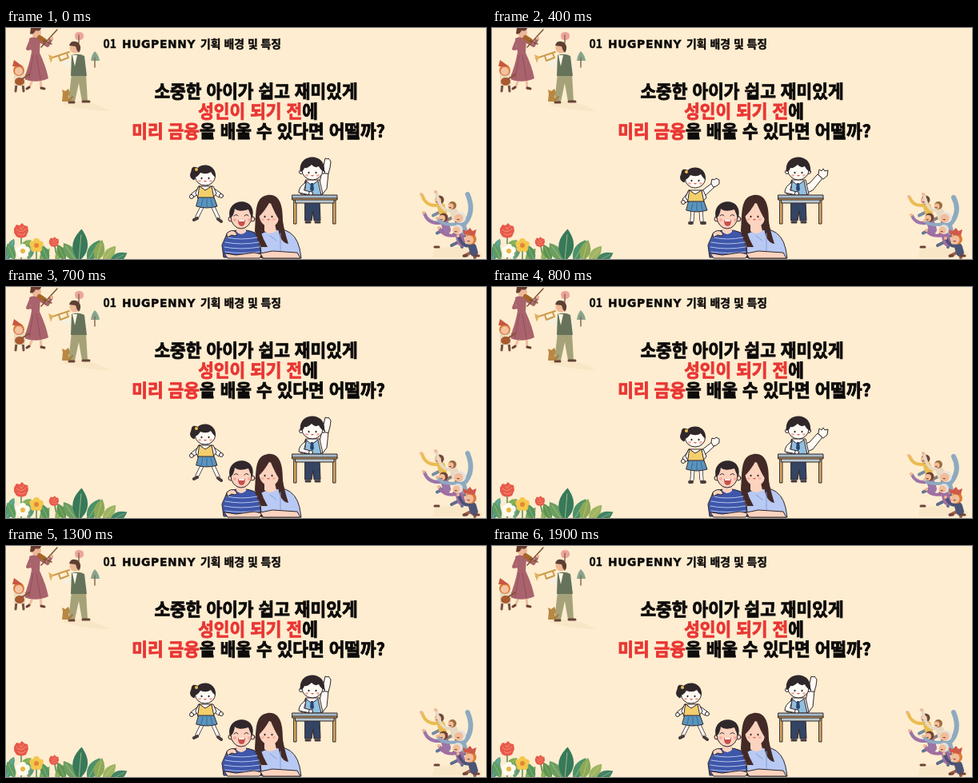
An HTML page for the animation above (2000 ms loop, 600 px wide and 289 px high).

```html
<!DOCTYPE html>
<html lang="ko">
<head>
<meta charset="utf-8">
<style>
  html, body { margin: 0; width: 100%; height: 100%; overflow: hidden; background: #feedd0; }
  svg { display: block; width: 600px; height: 289px; }
  text { font-family: "Noto Sans CJK KR", "Noto Sans CJK", sans-serif; font-weight: 900; fill: #0d0b0a; stroke: #0d0b0a; }
  .small { font-size: 13.9px; font-weight: 700; stroke-width: .4px; }
  .brand { font-family: "DejaVu Sans", sans-serif; font-size: 13.9px; letter-spacing: .6px; }
  .big { font-size: 21.4px; text-anchor: middle; stroke-width: .9px; }
  .red { fill: #e93633; stroke: #e93633; }
  .ink { stroke: #30262a; stroke-width: 1; stroke-linejoin: round; stroke-linecap: round; }
  .line { fill: none; stroke-linecap: round; stroke-linejoin: round; }
  .skin { fill: #fcd3be; }
  .white { fill: #fffaf4; }
  .hair { fill: #30272b; }
  .brown { fill: #432a27; }
</style>
</head>
<body>
<svg viewBox="0 0 600 289">
  <defs>
    <path id="leaf" d="M0 0Q-13-13 0-28Q13-13 0 0"/>
    <g id="petals">
      <circle cy="-5" r="4"/><circle cx="4.8" cy="-1.5" r="4"/><circle cx="3" cy="4" r="4"/>
      <circle cx="-3" cy="4" r="4"/><circle cx="-4.8" cy="-1.5" r="4"/>
    </g>
    <g id="carnation">
      <path d="M-9-3L-6-8-2-7 1-10 4-7 8-6 9 0 6 7Q0 10-6 7L-9 2Z" fill="#e8594b"/>
      <path class="line" d="M-6-2Q0 4 6-3M-4 3Q0 7 5 3M-2-5L0-2 3-6" stroke="#f59270"/>
    </g>
    <g id="face">
      <g fill="#282126"><ellipse cx="-4.5" rx="1" ry="1.3"/><ellipse cx="4.5" rx="1" ry="1.3"/></g>
      <g fill="#f6b3a5"><ellipse cx="-7" cy="3.5" rx="2" ry="1.4"/><ellipse cx="7" cy="3.5" rx="2" ry="1.4"/></g>
      <path d="M-2 3Q0 6 2 3Z" fill="#d8574f"/>
    </g>
    <g id="girlHead">
      <path class="hair ink" d="M-8-8Q-17-13-17-5Q-21 3-14 6Q-10 0-9-4Z"/>
      <ellipse class="white ink" cy="2" rx="12.500" ry="11"/>
      <path class="hair" d="M-13 3C-16-17 15-18 13 3Q9 0 7-4Q2 0-6-3Q-9 2-13 3Z"/>
      <circle cx="-11" cy="-7" r="2" fill="#e9c04e"/>
      <use href="#face" y="4"/>
    </g>
    <g id="girlBody">
      <path class="white ink" d="M241 198h18l4 9-4 5h-19l-3-5z"/>
      <path class="ink" d="M242 198l7 5 8-5 3 15h-20z" fill="#f4cf6c"/>
      <path class="ink" d="M241 212h19l4 11q-13 4-26 0z" fill="#5b94bd"/>
      <path class="line" d="M246 214l-2 9M251 214v10M256 214l2 9" stroke="#376a93"/>
    </g>
  </defs>
  <rect width="600" height="289" fill="#feedd0"/>

  <!-- musicians -->
  <g>
    <path d="M72 92Q104 88 130 104Q102 104 72 96Z" fill="#f9e6c6"/>
    <path d="M87 14q-3-8 3-9 8-1 7 7-3 5-10 2z" fill="#eda49b"/>
    <path d="M106 41q1-8 5-12 5 5 6 12z" fill="#86a58c"/>
    <path class="line" d="M91 9v10M111 37v12" stroke="#8b6a58" stroke-width="1.500"/>

    <path class="line" d="M34 63L29 75M43 63L44 76" stroke="#efbea0" stroke-width="3"/>
    <path class="line" d="M29 74l-3 2M44 75l4 1" stroke="#6b4038" stroke-width="3"/>
    <path d="M29 13Q36 9 43 14L42 31Q50 48 53 63Q38 70 22 64Q29 47 32 30Z" fill="#a9636d"/>
    <path class="line" d="M34 34L29 63M38 34L43 64" stroke="#90505d"/>
    <path class="line" d="M31 16L27 26L38 24M42 16L52 22L57 13" stroke="#a9636d" stroke-width="4"/>
    <circle cx="38" cy="6" r="6" fill="#edb799"/>
    <path d="M31 0h13Q43 5 37 3Q34 9 30 7Z" fill="#693c30"/>
    <path class="line" d="M42 12L48 16" stroke="#a6652a" stroke-width="6"/>
    <path class="line" d="M47 16L57 20M44 24L64 2" stroke="#7d5234" stroke-width="1.500"/>
    <circle cx="57" cy="13" r="2" fill="#edb799"/>

    <path d="M82 57h18l2 35h-7l-4-23-5 23h-8z" fill="#a5a279"/>
    <path class="line" d="M79 93h6M96 92h8" stroke="#674337" stroke-width="3"/>
    <path class="line" d="M85 36L75 46L69 38M97 37L100 49L82 47" stroke="#f6f0df" stroke-width="5"/>
    <path d="M82 34Q91 31 98 35L101 60H81z" fill="#66735a"/>
    <path d="M83 34h6l-3 14z" fill="#fff7e6"/>
    <circle cx="86" cy="25" r="6.500" fill="#eeb995"/>
    <path d="M79 22Q81 14 90 18Q96 24 91 31Q88 28 87 23Z" fill="#5d4034"/>
    <path class="line" d="M79 30L55 38M76 32l2 5-10 4-2-6" stroke="#cd9b4b" stroke-width="2"/>
    <path d="M59 36l-6-3 3 11z" fill="#e2b15b"/>

    <path class="line" d="M13 70l-1 9M21 70l1 9" stroke="#765045" stroke-width="3"/>
    <path d="M10 57h14v15H10z" fill="#e9dbc0"/>
    <circle cx="16" cy="53" r="7" fill="#d87b3e"/>
    <circle cx="16" cy="54" r="5" fill="#f5c2a0"/>
    <path d="M8 48L10 40L21 48Z" fill="#c9563f"/>
    <ellipse cx="17" cy="67" rx="6" ry="5" fill="#a9592f"/>
    <path class="line" d="M20 64L29 58" stroke="#865033" stroke-width="2"/>
    <path d="M70 92l1-10-1-5 4 2 4-3 2 5-2 5 3 6z" fill="#b88842"/>
    <path class="line" d="M79 91l4-5" stroke="#a97537" stroke-width="2"/>
  </g>

  <!-- flowers -->
  <g id="garden"></g>
  <use href="#carnation" x="19" y="254"/>
  <use href="#carnation" transform="translate(60 268) scale(.68)"/>
  <g fill="#fffbf0"><use href="#petals" x="21" y="279"/><circle cx="21" cy="279" r="3" fill="#eab541"/></g>
  <g fill="#f5c74c"><use href="#petals" x="38" y="272"/><circle cx="38" cy="272" r="3" fill="#e58735"/></g>

  <!-- heading -->
  <text class="small" x="121.500" y="25">01</text>
  <text class="small brand" x="145" y="25">HUGPENNY</text>
  <text class="small" x="243" y="25">기획 배경 및 특징</text>
  <text class="big" x="312.500" y="87">소중한 아이가 쉽고 재미있게</text>
  <text class="big" x="315" y="112"><tspan class="red">성인이 되기 전</tspan>에</text>
  <text class="big" x="315.500" y="137"><tspan class="red">미리 금융</tspan>을 배울 수 있다면 어떨까?</text>

  <!-- waving girl -->
  <g class="pose a">
    <path class="line ink" d="M246 222L239 236M258 222L265 237" style="stroke-width:5"/>
    <path class="line" d="M246 222L239 236M258 222L265 237" stroke="#fffaf4" stroke-width="3.500"/>
    <path class="line" d="M239 238l-4 2M265 239l4 3" stroke="#473c3d" stroke-width="4"/>
    <path class="white ink" d="M241 200l-10 8 3 4 9-6zM259 200l10 7-3 5-8-6z"/>
    <circle class="white ink" cx="232" cy="211" r="2.500"/><circle class="white ink" cx="269" cy="210" r="2.500"/>
    <use href="#girlBody"/><use href="#girlHead" x="249" y="184"/>
  </g>
  <g class="pose b">
    <path class="line ink" d="M251 228L250 241M261 228L262 241" style="stroke-width:5"/>
    <path class="line" d="M251 228L250 241M261 228L262 241" stroke="#fffaf4" stroke-width="3.500"/>
    <path class="line" d="M250 244h-3M262 244h4" stroke="#473c3d" stroke-width="4"/>
    <path class="white ink" d="M246 205l-8 9 4 5 7-7zM262 204l13-10 4 4-15 14z"/>
    <circle class="white ink" cx="239" cy="218" r="2.500"/>
    <path class="white ink" d="M274 194l1-5 3 1 2-2 4 2 0 5-4 3-3 1z"/>
    <use href="#girlBody" x="5" y="5"/><use href="#girlHead" x="254" y="187"/>
  </g>

  <!-- boy at the desk -->
  <g class="pose a">
    <path class="white ink" d="M390 202l5-22 8 1-2 20-7 9z"/>
    <path class="white ink" d="M395 181l-1-12 3 3 2-9 3 1 1-1 3 4-1 8-2 7z"/>
  </g>
  <g class="pose b">
    <path class="white ink" d="M390 197l7-3 10-11 6 5-12 15-9 4z"/>
    <path class="white ink" d="M408 183l1-6 3 2 2-3 2 3 4-1-1 7-5 4z"/>
  </g>
  <path class="ink" d="M374 216h18l1 25h-8l-1-12-2 12h-8z" fill="#344463"/>
  <path class="line" d="M375 243h5M387 243h5" stroke="#433a3e" stroke-width="3"/>
  <path class="white ink" d="M375 190h17l4 18h-27z"/>
  <path class="ink" d="M375 191l7 6 8-6 4 18h-20z" fill="#91bfdf"/>
  <path d="M381 194h3l1 8-2 3-3-3z" fill="#29456e"/>
  <path class="white ink" d="M375 193q-9 5-9 13l14 3 1-4-8-2z"/>
  <circle class="white ink" cx="381" cy="207" r="2.500"/>
  <circle class="white ink" cx="369" cy="180" r="2.500"/><circle class="white ink" cx="396" cy="180" r="2.500"/>
  <ellipse class="white ink" cx="383" cy="178" rx="13" ry="12"/>
  <path class="hair" d="M368 180C364 156 401 155 398 180Q393 178 391 173Q386 176 382 171Q377 176 373 175Q372 179 368 180Z"/>
  <use href="#face" x="383" y="181"/>
  <g class="ink" fill="#e1ad62">
    <path d="M360 214h3v31h-3zM409 214h3v31h-3z"/>
    <path d="M362 214h48v5h-48z" fill="#b9c7ce"/>
    <path d="M358 209h56v5h-56z" fill="#a9bcc9"/>
    <path d="M358 213h56v2h-56z"/>
  </g>

  <!-- mother and son -->
  <path class="brown" d="M311 254C313 231 310 212 327 209C344 207 346 226 346 241Q347 255 354 269L334 274Q317 277 311 254Z"/>
  <path class="ink" d="M317 258q12-7 32-5 14 5 18 23l2 12h-49z" fill="#b8c9f3"/>
  <path class="skin" d="M323 245h13l2 9q-8 6-15 0z"/>
  <ellipse class="skin" cx="329" cy="234" rx="12.500" ry="15" transform="rotate(-10 329 234)"/>
  <path class="brown" d="M315 237Q311 211 327 210Q346 212 342 241Q336 232 330 217Q323 230 315 237Z"/>
  <path class="brown" d="M342 225Q347 251 353 270Q341 268 340 247ZM315 240Q318 259 327 274L319 274Q310 257 315 240Z"/>
  <use href="#face" x="328" y="236"/>
  <path class="line" d="M343 257v28M330 260l8 6" stroke="#879ed3"/>
  <path class="ink" d="M277 256q18-7 34 0 7 13 8 31h-47l-2-15z" fill="#3f57aa"/>
  <path class="line" d="M276 262q18 4 38 0M274 268q20 4 42 0M273 274q20 4 44 0M274 280q20 3 43 0" stroke="#b4c4ee"/>
  <path class="skin" d="M288 247h12v8q-6 6-12 0z"/>
  <circle class="skin ink" cx="281" cy="239" r="3"/><circle class="skin ink" cx="308" cy="239" r="3"/>
  <ellipse class="skin ink" cx="294" cy="236" rx="13" ry="15"/>
  <path class="hair" d="M280 238C273 212 315 209 308 238Q305 233 303 227Q291 231 286 226Q285 235 280 238Z"/>
  <path class="line ink" d="M285 235q3-3 5 0M298 235q3-3 5 0"/>
  <path d="M290 240h9q0 8-4.500 8t-4.500-8" fill="#c94f4e"/>
  <path d="M291 240h7v2h-7z" fill="#fff"/>
  <g fill="#f8aaa0"><circle cx="286" cy="240" r="2"/><circle cx="304" cy="240" r="2"/></g>
  <path class="skin ink" d="M276 257q6-6 11-2l2 4-3 1-4-1-5 3z"/>
  <path class="skin ink" d="M273 282l4 6h40l3-5-10-2-22 3z"/>
  <path class="skin ink" d="M318 282l15-3 31 2 4 7h-46z"/>

  <!-- cheering crowd -->
  <path d="M535 278Q565 268 596 282L594 287H533Z" fill="#f9e6c6"/>
  <g id="crowd"></g>
</svg>
<script>
  const byId = id => document.getElementById(id);

  // x, base y, scale, angle, colour
  const leaves = [
    [0, 291, .9, 20, "#4b9280"], [3, 279, .6, 25, "#5aa18a"], [11, 290, .8, -25, "#5d9b62"],
    [18, 275, .6, 55, "#81ad57"], [28, 290, .8, 10, "#5f9a75"], [42, 291, .7, 40, "#75a654"],
    [53, 291, .8, -25, "#57955e"], [62, 291, .7, 30, "#8aad5a"], [74, 291, .8, -25, "#5d9451"],
    [88, 292, 1, -35, "#6c9e62"], [91, 292, 1.45, 5, "#377959"], [102, 292, 1.1, 30, "#4d9168"],
    [113, 292, 1, 15, "#8da856"], [121, 292, .9, 40, "#a0b563"], [129, 293, .9, 63, "#438365"]
  ];
  byId("garden").innerHTML =
    '<path class="line" d="M19 257V289M38 274V289M60 268L64 289" stroke="#568a4d" stroke-width="1.5"/>' +
    leaves.map(([x, y, s, angle, color]) =>
      `<g transform="translate(${x} ${y}) rotate(${angle}) scale(${s})" fill="${color}"><use href="#leaf"/>
       <path class="line" d="M0 0V-23" stroke="#dce3a3" stroke-width=".4"/></g>`).join("");

  // head x, head y, radius, hair, shirt, trousers, left hand x, left hand y
  const people = [
    [541, 215, 5.5, "#70483a", "#eabc51", "#778ca4", 518, 211],
    [557, 222, 5, "#9d6b3f", "#e7d9c2", "#8b7c77", 536, 208],
    [546, 237, 5.5, "#704435", "#9c75a9", "#637697", 521, 234],
    [567, 237, 7, "#e8e4df", "#8daac0", "#7c6d89", 538, 241],
    [564, 252, 6, "#e4dfda", "#a16da0", "#5f6b8b", 540, 253],
    [580, 264, 7, "#db7c35", "#4b5476", "#9b5e4a", 564, 263]
  ];
  const person = ([x, y, r, hair, shirt, trousers, hx, hy], raised) => {
    const handX = hx + (raised ? 0 : 2), handY = hy + (raised ? -2 : 1);
    return `<path class="line" d="M${x + 3} ${y + r + 9}l-10 5M${x + 5} ${y + r + 9}l1 7" stroke="${trousers}" stroke-width="4"/>
      <path class="line" d="M${x + 3} ${y + r + 3}l2 7" stroke="${shirt}" stroke-width="10"/>
      <path class="line" d="M${x} ${y + r + 1}Q${handX + 7} ${y + r + 4} ${handX + 2} ${handY}" stroke="${shirt}" stroke-width="4"/>
      <circle cx="${handX + 1}" cy="${handY - 1}" r="2" fill="#efb892"/>
      <circle cx="${x + 1}" cy="${y}" r="${r}" fill="${hair}"/>
      <circle cx="${x - 1}" cy="${y + 1}" r="${r - 1.5}" fill="#f2bd99"/>
      <path d="M${x - 4} ${y + 2}h4q-1 3-4 0" fill="#944f43"/>`;
  };
  const crowd = raised =>
    `<path class="line" d="M574 244Q586 229 577 ${raised ? 208 : 212}" stroke="#8daac0" stroke-width="6"/>` +
    people.map(p => person(p, raised)).join("") +
    `<path d="M572 258l-1-6 5 2 4-4 3 4 5-2-2 8z" fill="#cf594a"/>
     <path class="line" d="M576 285h-4M586 285h5M541 274h-5" stroke="#6e4339" stroke-width="3"/>`;
  byId("crowd").innerHTML =
    `<g class="pose a">${crowd(true)}</g><g class="pose b">${crowd(false)}</g>`;

  const poses = [...document.querySelectorAll(".pose")];
  const start = performance.now();
  function draw(now) {
    const step = Math.floor(Math.max(0, now - start) % 2000 / 100);
    const active = step === 0 || step % 2 ? "a" : "b";
    for (const pose of poses) pose.style.display = pose.classList.contains(active) ? "" : "none";
    requestAnimationFrame(draw);
  }
  draw(start);
</script>
</body>
</html>
```
